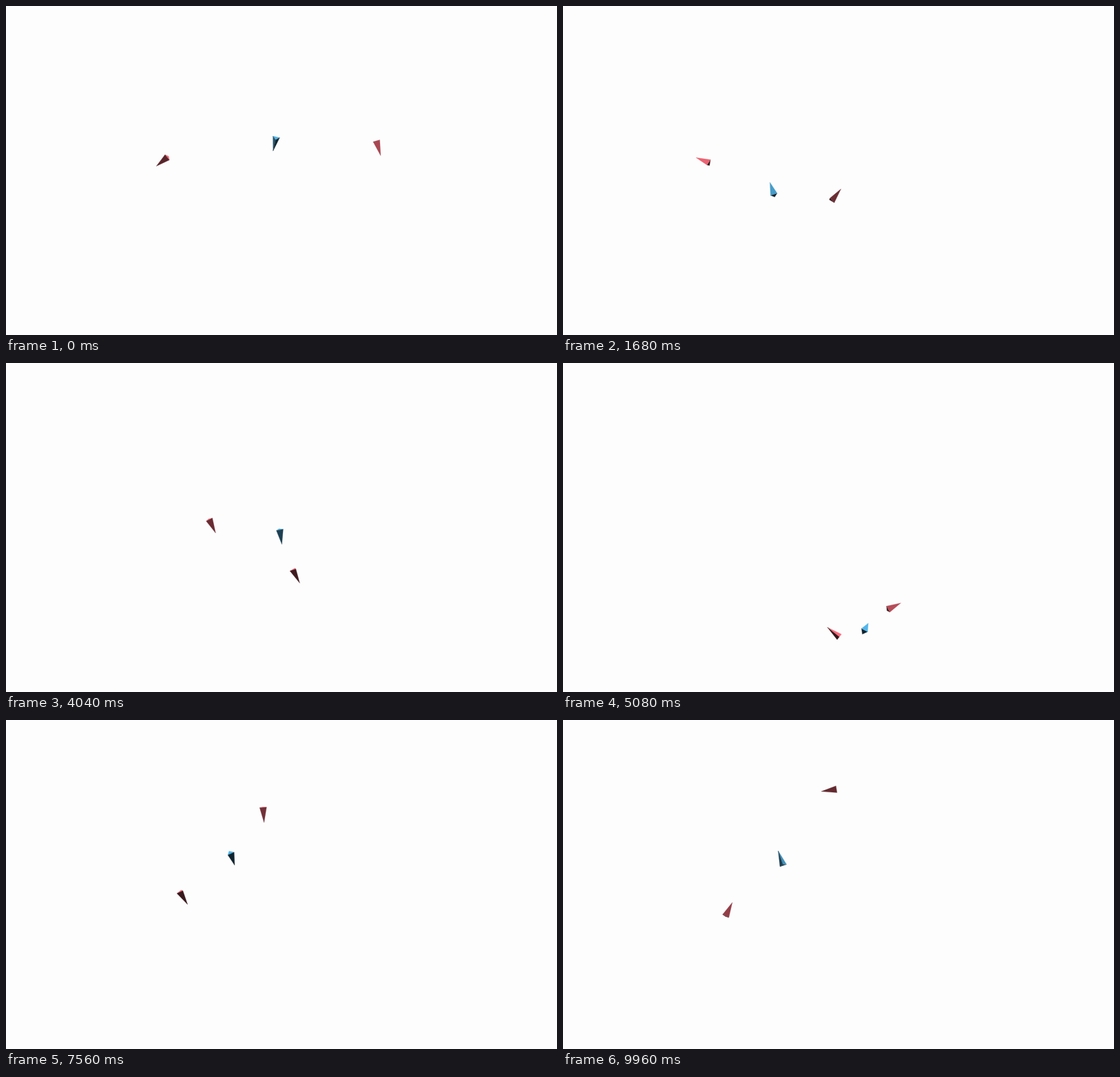
An HTML page with a canvas that plays this animation: 800x478 px, repeating every 10 s.

```html
<!DOCTYPE html>
<html lang="en">
<head>
<meta charset="utf-8">
<title>Three darts</title>
<style>
  html, body { margin: 0; width: 100%; height: 100%; overflow: hidden; background: #fdfdfd; }
  canvas { display: block; }
</style>
</head>
<body>
<canvas id="stage" width="800" height="478"></canvas>
<script>
const ctx = document.getElementById('stage').getContext('2d');
const LOOP = 10000, STEP = 40;
const SPEED = .23; // px per ms
const LENGTH = 22.3, RADIUS = 5.8;
const RED = [255, 108, 124], BLUE = [82, 182, 234];

// The flock steers through a few poses: x, y, heading, pitch, roll (degrees)
const times = [0, 1680, 3000, 5080, 6400, 8680, 9960];
const pose = (x, y, heading, pitch = 0, roll = 30) => ({ x, y, heading, pitch, roll });
const darts = [
  {
    color: RED,
    poses: [
      pose(226.5, 226, 141, -18), pose(396.5, 274, -49, -15, 5), pose(339, 65, 178),
      pose(481, 353.5, -27, -18, 38), pose(340.5, 171.5, 183, 0, -10),
      pose(386, 261.5, -47, -25), pose(386, 102, 171, 0, 38)
    ]
  },
  {
    color: RED,
    poses: [
      pose(541, 207, 74, 12), pose(202.5, 224.5, 204, -22, 5), pose(249, 128, 13, -20, 40),
      pose(392.5, 391, 219, 0, -30), pose(302, 80.5, -68, -8),
      pose(290.5, 384, 144, 0, 35), pose(241, 275, -64, -6)
    ]
  },
  {
    color: BLUE,
    poses: [
      pose(390, 201, 103, -30, -30), pose(303.5, 265.5, 252, -28), pose(293, 92.5, -20, 28, 42),
      pose(440, 384, -62, -52), pose(339.5, 155.5, 233, 0, 50),
      pose(334, 322, 202, -60), pose(316, 200.5, 251, -10, -30)
    ]
  }
];

const rad = deg => deg * Math.PI / 180;
const mix = (a, b, k) => a + (b - a) * k;
const clamp = (v, lo, hi) => Math.min(hi, Math.max(lo, v));

// Cubic curve through a and b with end slopes ma and mb: value and slope at k
function hermite(a, b, ma, mb, k) {
  const c = 3 * (b - a) - 2 * ma - mb, d = 2 * (a - b) + ma + mb;
  return [a + k * (ma + k * (c + k * d)), ma + k * (2 * c + 3 * k * d)];
}

function stateAt(poses, t) {
  const i = Math.max(0, times.findLastIndex((time, n) => time <= t && n < times.length - 1));
  const span = times[i + 1] - times[i], k = clamp((t - times[i]) / span, 0, 1);
  const a = poses[i], b = poses[i + 1];
  const velocity = (p, trig) => SPEED * span * Math.cos(rad(p.pitch)) * trig(rad(p.heading));
  const [x, dx] = hermite(a.x, b.x, velocity(a, Math.cos), velocity(b, Math.cos), k);
  const [y, dy] = hermite(a.y, b.y, velocity(a, Math.sin), velocity(b, Math.sin), k);
  return {
    x, y,
    heading: Math.atan2(dy, dx),
    pitch: rad(mix(a.pitch, b.pitch, k)),
    roll: rad(mix(a.roll, b.roll, k))
  };
}

// normalY is the vertical part of the face normal; light falls from above
function face(points, color, normalY) {
  const shade = clamp(.5 - .8 * normalY, .2, 1);
  ctx.fillStyle = ctx.strokeStyle = `rgb(${color.map(c => Math.round(c * shade)).join()})`;
  ctx.beginPath();
  points.forEach(p => ctx.lineTo(p[0], p[1]));
  ctx.closePath();
  ctx.fill();
  ctx.stroke();
}

// A three-sided cone, seen without perspective
function drawDart({ color, poses }, t) {
  const { x, y, heading, pitch, roll } = stateAt(poses, t);
  const ch = Math.cos(heading), sh = Math.sin(heading);
  const cp = Math.cos(pitch), sp = Math.sin(pitch);
  const half = LENGTH / 2 * cp;
  const across = a => [
    -sh * Math.cos(a) - sp * ch * Math.sin(a),
    ch * Math.cos(a) - sp * sh * Math.sin(a)
  ];
  const tip = [x + ch * half, y + sh * half];
  const angles = [0, 1, 2].map(n => roll + n * Math.PI * 2 / 3);
  const base = angles.map(a => {
    const [u, v] = across(a);
    return [x - ch * half + u * RADIUS, y - sh * half + v * RADIUS];
  });

  if (sp < 0) face(base, color, -cp * sh);
  angles.forEach((a, n) => {
    const p = base[n], q = base[(n + 1) % 3];
    const facing = (p[0] - tip[0]) * (q[1] - tip[1]) - (p[1] - tip[1]) * (q[0] - tip[0]);
    if (facing > 0) face([tip, p, q], color, across(a + Math.PI / 3)[1]);
  });
}

function draw(ms) {
  let t = Math.floor(ms % LOOP / STEP) * STEP;
  if (t > 280 && t < 520) t = 280; // short hold near the start
  ctx.fillStyle = '#fdfdfd';
  ctx.fillRect(0, 0, 800, 478);
  ctx.lineWidth = .3;
  ctx.lineJoin = 'round';
  darts.forEach(dart => drawDart(dart, t));
}

const start = performance.now();
function tick() {
  draw(performance.now() - start);
  requestAnimationFrame(tick);
}
tick();
</script>
</body>
</html>
```
